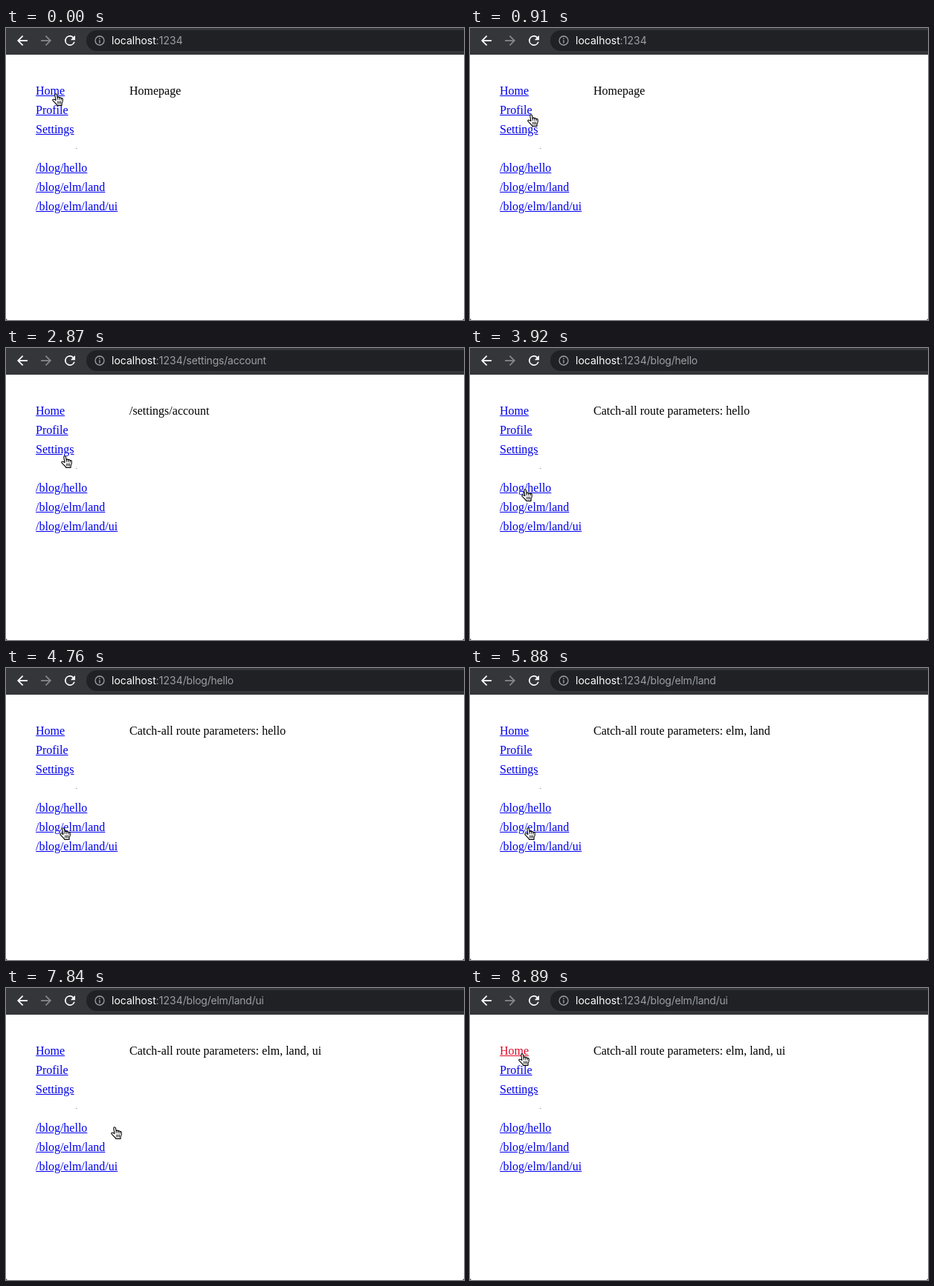
Recreate the animation shown at these times as an HTML page. Size 616 by 394 pixels, loop 8.96 s.

```html
<!DOCTYPE html>
<html lang="en">
<head>
<meta charset="utf-8">
<title>Routes</title>
<style>
  html, body { margin: 0; width: 100%; height: 100%; overflow: hidden; background: #fff; }
  #stage { position: relative; width: 616px; height: 394px; overflow: hidden; }
  svg { position: absolute; left: 0; top: 0; }
  #url { position: absolute; left: 142px; top: 5px; font: 14px/24px Inter, sans-serif; color: #fff; white-space: nowrap; }
  #url span { color: #9aa0a6; }
  #path { letter-spacing: -.22px; }
  .line { position: absolute; font: 16px/26px "Liberation Serif", "Times New Roman", serif; white-space: nowrap; color: #000; }
  a.line { left: 40px; text-decoration: underline; color: #00e; }
  #body { left: 166px; top: 72px; }
</style>
</head>
<body>
<div id="stage">
  <svg width="616" height="394">
    <rect width="616" height="36" fill="#35363a"/>
    <rect x="108" y="3" width="540" height="28" rx="14" fill="#202124"/>
    <g id="icons">
      <path id="arrow" transform="translate(11.5 6.5) scale(.875)" fill="#fff" d="M20 11H7.83l5.59-5.59L12 4l-8 8 8 8 1.41-1.41L7.83 13H20z"/>
      <path transform="translate(64.5 6.5) scale(-.875 .875)" fill="#87888b" d="M20 11H7.83l5.59-5.59L12 4l-8 8 8 8 1.41-1.41L7.83 13H20z"/>
      <path transform="translate(75.5 6.5) scale(.875)" fill="#fff" d="M17.65 6.35A8 8 0 1 0 19.73 14h-2.08A6 6 0 1 1 12 6c1.66 0 3.14.69 4.22 1.78L13 11h7V4z"/>
      <circle cx="126" cy="17" r="6" fill="none" stroke="#9aa0a6" stroke-width="1.3"/>
      <path d="M126 13.4v1.5M126 16.2v4.2" stroke="#9aa0a6" stroke-width="1.4"/>
    </g>
    <rect x="94" y="162" width="1.5" height="1" fill="#999"/>
    <path d="M0 392v2h2zM616 392v2h-2z" fill="#555"/>
  </svg>
  <div id="url">localhost<span>:1234<span id="path"></span></span></div>
  <div id="body" class="line"></div>
  <svg width="616" height="394" style="z-index:1">
    <g id="hand" fill="#fff" stroke="#000" stroke-width="1.1" stroke-linejoin="round" stroke-linecap="round">
      <path d="M4.9 9.6L3.8 2.3Q3.7.8 4.9.7T6.4 1.9L7.2 6.2Q7.4 5 8.5 5.1T9.8 6.3Q10 5.5 11 5.7T12.2 7Q12.5 6.4 13.4 6.6T14.3 8.2Q14.6 11.5 13.2 13.3L13 16.4H6.5L6 15Q3.5 12.5 1 9.8Q.4 8.6 1.6 8.3T4.9 9.6z"/>
      <path d="M7.2 6.2V8.6M9.8 6.3V8.8M12.2 7V9M7.7 11V14M9.6 11V14M11.5 11V14" stroke-width=".9"/>
    </g>
  </svg>
</div>
<script>
const LOOP = 8960, STEP = 70;
const BLUE = '#00e', WARM = '#4a05b0', RED = '#dc0a28';
const $ = id => document.getElementById(id);

// link label, row
const links = [['Home', 0], ['Profile', 1], ['Settings', 2],
  ['/blog/hello', 4], ['/blog/elm/land', 5], ['/blog/elm/land/ui', 6]].map(([label, row]) => {
  const a = document.createElement('a');
  a.className = 'line';
  a.textContent = label;
  a.style.top = 72 + row * 26 + 'px';
  return $('stage').appendChild(a);
});

const params = 'Catch-all route parameters: ';
// start of press, full press, page shown, path, page text
const visits = [
  [8750, 8890, 0, '', 'Homepage'],
  [1120, 1190, 1330, '/profile/me', '/profile/me'],
  [2310, 2450, 2520, '/settings/account', '/settings/account'],
  [3780, 3850, 3920, '/blog/hello', params + 'hello'],
  [5180, 5320, 5390, '/blog/elm/land', params + 'elm, land'],
  [6580, 6650, 6790, '/blog/elm/land/ui', params + 'elm, land, ui']
];

// pointer: time, x, y
const moves = [
  [0, 62, 88], [280, 62, 88], [490, 92, 95], [630, 113, 112], [770, 100, 125], [980, 66, 112],
  [1260, 66, 112], [1540, 90, 122], [1820, 102, 133], [2030, 88, 141], [2170, 76, 142],
  [2660, 76, 142], [2870, 74, 145], [3150, 70, 170], [3430, 67, 192], [3500, 67, 192], [3640, 69, 190],
  [4270, 69, 190], [4480, 90, 212], [4620, 84, 222], [4760, 72, 215],
  [5810, 72, 215], [5880, 72.5, 215], [6090, 104, 232], [6230, 122, 241],
  [7420, 122, 241], [7630, 138, 222], [7840, 141, 187], [8120, 108, 128], [8330, 71, 94], [8470, 65, 88], [LOOP, 65, 88]
];

function pointer(t) {
  const i = moves.findIndex(m => m[0] > t);
  const [t0, x0, y0] = moves[i - 1], [t1, x1, y1] = moves[i];
  const k = (t - t0) / (t1 - t0);
  return [x0 + (x1 - x0) * k, y0 + (y1 - y0) * k].map(Math.round);
}

function draw(now) {
  const t = Math.floor(now % LOOP / STEP) * STEP;
  const page = visits.filter(v => v[2] <= t).pop();
  $('path').textContent = page[3];
  $('body').textContent = page[4];
  visits.forEach(([warm, full, done], i) => {
    const pressed = t >= warm && t < (done || LOOP);
    links[i].style.color = pressed ? (t < full ? WARM : RED) : BLUE;
  });
  $('hand').setAttribute('transform', `translate(${pointer(t)})`);
}

const start = performance.now();
function tick() {
  draw(performance.now() - start);
  requestAnimationFrame(tick);
}
tick();
</script>
</body>
</html>
```
